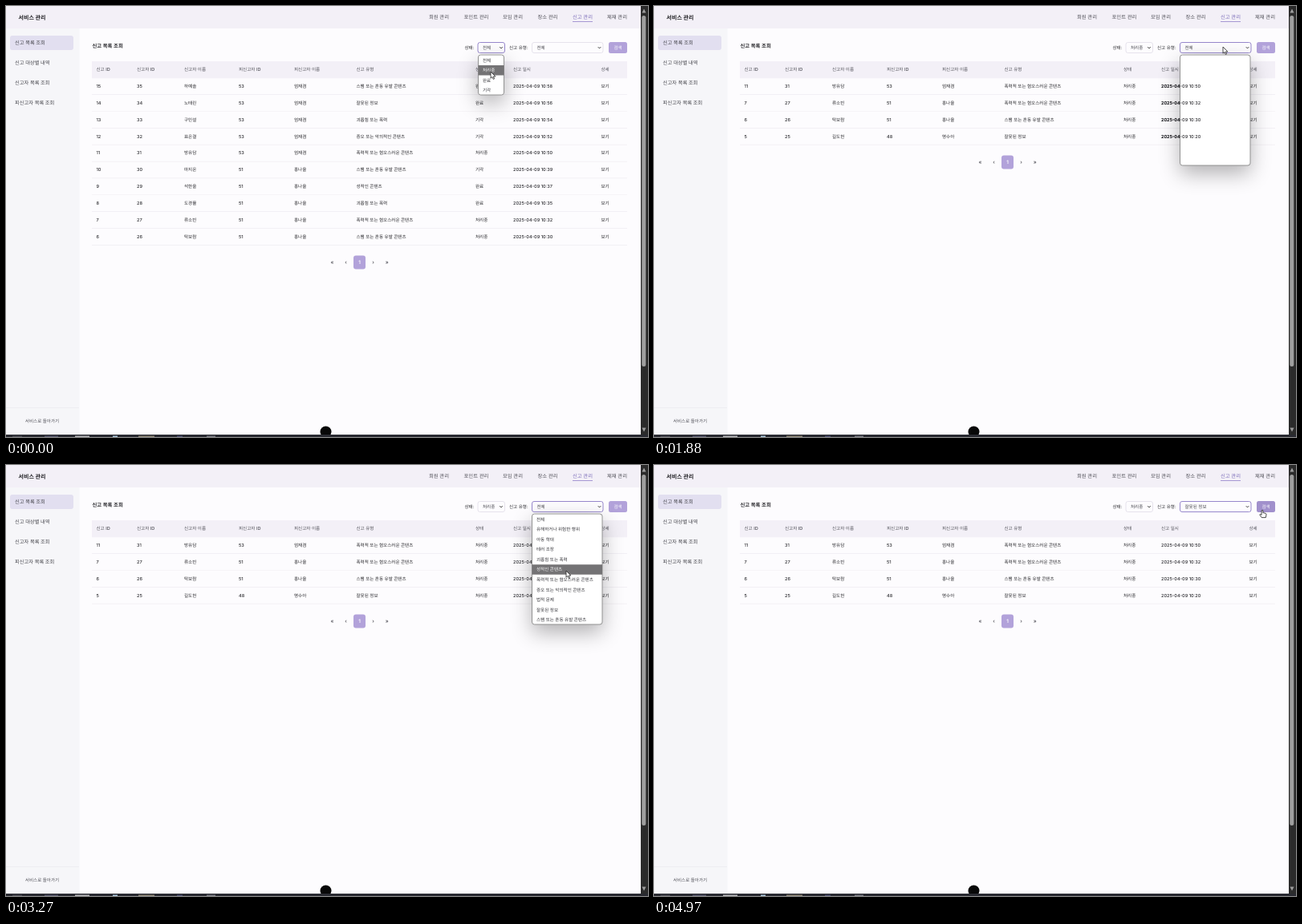
An HTML page with a canvas for the animation above (5000 ms loop, 800x538 px).

```html
<!DOCTYPE html>
<html lang="ko">
<head>
<meta charset="utf-8">
<title>신고 목록 조회</title>
<style>
html, body { margin: 0; width: 100%; height: 100%; overflow: hidden; }
canvas { display: block; }
</style>
</head>
<body>
<canvas id="stage" width="800" height="538"></canvas>
<script>
const g = document.getElementById('stage').getContext('2d');
const LOOP = 5000, ROW = 20.85, ITEM = 12.55;
const PICK_STATUS = 300, RELOAD = 1140, OPEN = 1865, FILL = 1900, PICK_TYPE = 4450;
const PURPLE = '#b2a2da', FOCUS = '#9788cc';

const HATE = '폭력적 또는 혐오스러운 콘텐츠', SPAM = '스팸 또는 혼동 유발 콘텐츠',
  WRONG = '잘못된 정보', BULLY = '괴롭힘 또는 폭력', SEX = '성적인 콘텐츠',
  MALICE = '증오 또는 악의적인 콘텐츠';
const TYPES = ['전체', '유해하거나 위험한 행위', '아동 학대', '테러 조장', BULLY, SEX,
  HATE, MALICE, '법적 문제', WRONG, SPAM];
const STATES = ['전체', '처리중', '완료', '기각'];

const COLS = [112.5, 163, 222, 290, 359, 436.5, 585, 632, 741.5];
const HEAD = ['신고 ID', '신고자 ID', '신고자 이름', '피신고자 ID', '피신고자 이름',
  '신고 유형', '상태', '신고 일시', '상세'];
const REPORTS = [
  [15, '하예솔', 53, '엄재겸', SPAM, '완료', '10:58'],
  [14, '노태린', 53, '엄재겸', WRONG, '완료', '10:56'],
  [13, '구민설', 53, '엄재겸', BULLY, '기각', '10:54'],
  [12, '표은결', 53, '엄재겸', MALICE, '기각', '10:52'],
  [11, '방유담', 53, '엄재겸', HATE, '처리중', '10:50'],
  [10, '마지온', 51, '홍나율', SPAM, '기각', '10:39'],
  [9, '석한울', 51, '홍나율', SEX, '완료', '10:37'],
  [8, '도경률', 51, '홍나율', BULLY, '완료', '10:35'],
  [7, '류소빈', 51, '홍나율', HATE, '처리중', '10:32'],
  [6, '탁보람', 51, '홍나율', SPAM, '처리중', '10:30'],
  [5, '길도헌', 48, '명수아', WRONG, '처리중', '10:20']
].map(([id, who, target, name, type, state, time]) =>
  [id, id + 20, who, target, name, type, state, '2025-04-09 ' + time, '보기']);
const FIRST_PAGE = REPORTS.slice(0, 10);
const PENDING = REPORTS.filter(r => r[6] === '처리중');

// Pointer stops: time, x, y
const PATH = [[0, 604, 82], [300, 604, 81], [820, 756, 53], [1610, 757, 53],
  [1850, 709, 51], [2000, 709, 51], [2500, 706, 135], [3270, 698, 132],
  [3500, 698, 133], [4150, 695, 176], [4450, 695, 176], [4970, 758, 56], [5000, 758, 56]];

const ARROW = new Path2D('M0 0V8.2L1.9 6.5 3.2 9.4 4.6 8.8 3.3 6H5.9Z');
const HAND = new Path2D('M-.9 .8Q0-.6 .9 .8V3.6L4.2 4.4Q5.2 4.8 5 6L4.3 9.6H-.8L-3.2 6.2Q-3 4.9-1.9 5.6L-.9 6.4Z');

function rect(x, y, w, h, fill, r = 0, stroke) {
  g.beginPath();
  g.roundRect(x, y, w, h, r);
  if (fill) { g.fillStyle = fill; g.fill(); }
  if (stroke) { g.strokeStyle = stroke; g.lineWidth = 1; g.stroke(); }
}

function text(s, x, y, { size = 5.55, color = '#28282c', weight = 500, align = 'left' } = {}) {
  g.font = `${weight} ${size}px Inter, "Noto Sans CJK KR", "Noto Sans CJK", sans-serif`;
  g.fillStyle = color;
  g.textAlign = align;
  g.fillText(s, x, y + size * .36);
}

function line(points, color, width) {
  g.beginPath();
  points.forEach(p => g.lineTo(...p));
  g.strokeStyle = color;
  g.lineWidth = width;
  g.stroke();
}

function triangle(x, y, d) {
  g.beginPath();
  g.moveTo(x - 2.5, y + d);
  g.lineTo(x + 2.5, y + d);
  g.lineTo(x, y - d * 1.5);
  g.fillStyle = '#a0a0a0';
  g.fill();
}

function pointer(t) {
  const i = PATH.findIndex(p => t < p[0]);
  const [t0, x0, y0] = PATH[i - 1], [t1, x1, y1] = PATH[i];
  const u = (t - t0) / (t1 - t0), s = u * u * (3 - 2 * u);
  return [x0 + (x1 - x0) * s, y0 + (y1 - y0) * s];
}

function frame() {
  rect(0, 0, 800, 538, '#fdfcfe');
  rect(0, 28, 91.5, 507, '#f6f6f9');
  rect(0, 0, 791, 28, '#f3f0f7');
  text('서비스 관리', 15.5, 14, { size: 7, weight: 700, color: '#202024' });
  ['회원 관리', '포인트 관리', '모임 관리', '장소 관리', '신고 관리', '제재 관리'].forEach((s, i) =>
    text(s, [527, 570.5, 619, 662.5, 706, 749][i], 13.7,
      { size: 6.35, color: i === 4 ? '#7f70bb' : '#505058' }));
  rect(706, 19, 25, 1, '#a697d3');

  rect(5, 37, 79, 18, '#e2dff0', 3);
  ['신고 목록 조회', '신고 대상별 내역', '신고자 목록 조회', '피신고자 목록 조회'].forEach((s, i) =>
    text(s, 11, 45.7 + 25.1 * i, { size: 6.25, color: '#45454c' }));
  rect(0, 501, 91, .7, '#ebeaf0');
  text('서비스로 돌아가기', 45, 518, { color: '#505058', align: 'center' });

  rect(791, 0, 9, 538, '#2b2b2b');
  rect(792.3, 12, 5, 438, '#9f9f9f', 2.5);
  triangle(795, 6.5, 2);
  triangle(795, 528.5, -2);
  g.beginPath();
  g.arc(398.5, 531.5, 7, 0, 7);
  g.fillStyle = '#080808';
  g.fill();
  rect(0, 535, 800, 3, '#292a31');
  [[8, 12], [48, 17], [86, 18], [133, 6], [165, 20], [213, 7], [250, 11]].forEach(([x, w], i) =>
    rect(x, 536.5, w, 1.5, ['#4a4b52', '#55566a', '#b5b5b8', '#a8c4d8', '#8c8474', '#4d5070', '#777880'][i]));
}

function table(rows) {
  rect(107, 69, 667, 21.3, '#f3f0f7');
  HEAD.forEach((s, i) => text(s, COLS[i], 79.5, { color: '#505058' }));
  rows.forEach((row, r) => {
    row.forEach((s, i) => text(s, COLS[i], 100 + ROW * r));
    rect(107, 110.3 + ROW * r, 667, .7, '#efedf2');
  });
  const y = 111.6 + ROW * rows.length;
  rect(433, y - 8.5, 15, 17, PURPLE, 3);
  ['«', '‹', '1', '›', '»'].forEach((s, i) =>
    text(s, 406.5 + 17.05 * i, y, { size: 6.2, align: 'center', weight: 600, color: i === 2 ? '#fff' : '#55555c' }));
}

function select(x, w, value, focused) {
  rect(x, 45.5, w, 13, '#fdfcfe', 2.5, focused ? FOCUS : '#e6e3ec');
  text(value, x + 6, 52, { color: '#45454c' });
  const cx = x + w - 4.5;
  line([[cx - 1.7, 51.2], [cx, 52.9], [cx + 1.7, 51.2]], '#333', 1);
}

function popupBox(x, w, h) {
  g.save();
  g.shadowColor = 'rgba(0,0,0,.3)';
  g.shadowBlur = 26;
  g.shadowOffsetY = 10;
  rect(x, 61, w, h, '#fff', 3);
  g.restore();
  rect(x, 61, w, h, null, 3, '#929292');
}

function options(x, w, items, y) {
  const hover = Math.max(0, Math.min(items.length - 1, Math.floor((y - 61.4) / ITEM)));
  items.forEach((s, i) => {
    const cy = 67.7 + ITEM * i;
    if (i === hover) rect(x, cy - 6.25, w, 12.5, '#747375');
    text(s, x + 5.5, cy, { color: i === hover ? '#fff' : '#333338' });
  });
}

function draw(now) {
  const t = now % LOOP, [x, y] = pointer(t);
  const onButton = x >= 751 && x <= 774 && y >= 45 && y <= 59;
  const rows = t < RELOAD ? FIRST_PAGE : PENDING;

  frame();
  text('신고 목록 조회', 107.5, 49.5, { size: 6.35, weight: 600 });
  text('상태:', 571.5, 52);
  text('신고 유형:', 627, 52);
  select(588, 33.5, t < PICK_STATUS ? '전체' : '처리중', t < RELOAD - 30);
  select(655.5, 88.5, t < PICK_TYPE ? '전체' : WRONG, t >= OPEN - 20);
  rect(751, 45, 23, 14, onButton ? '#a190cc' : PURPLE, 2.5);
  text('검색', 762.5, 52, { color: '#fff', align: 'center' });
  table(rows);

  if (t < PICK_STATUS) {
    popupBox(588.5, 32, 50);
    options(588.5, 32, STATES, y);
  } else if (t >= OPEN && t < PICK_TYPE) {
    popupBox(655.5, 87.5, 138);
    if (t >= FILL) options(655.5, 87.5, TYPES, y);
    else rows.forEach((row, r) => text(row[7], COLS[7], 100 + ROW * r));
  }

  g.save();
  g.translate(x, y);
  const shape = onButton || (t > 4800 && y < 64) ? HAND : ARROW;
  g.fillStyle = '#fff';
  g.fill(shape);
  g.strokeStyle = '#222';
  g.lineWidth = .8;
  g.stroke(shape);
  g.restore();
}

g.textRendering = 'geometricPrecision';
const start = performance.now();
function tick() {
  draw(performance.now() - start);
  requestAnimationFrame(tick);
}
tick();
</script>
</body>
</html>
```
